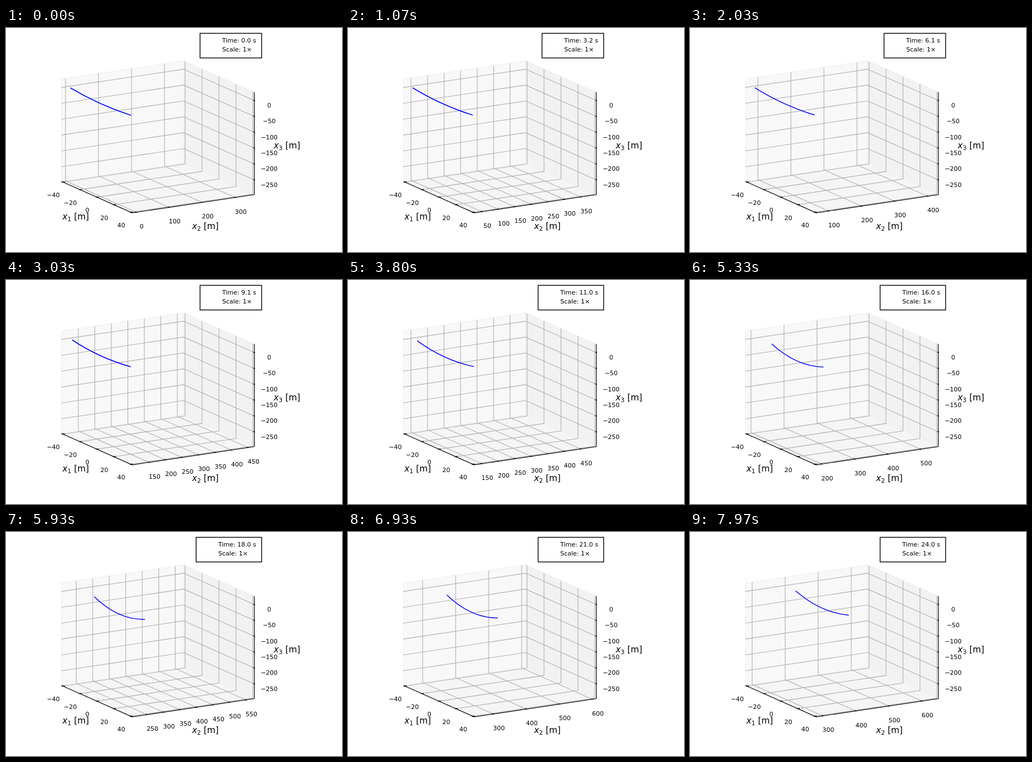
Animation of 600x400 px, one loop 8 s. Source, as an HTML page:

```html
<!DOCTYPE html>
<html lang="en">
<head>
<meta charset="utf-8">
<style>
  html, body { margin: 0; width: 100%; height: 100%; overflow: hidden; background: #fff; }
  svg { display: block; }
  text { font: 11px "DejaVu Sans", sans-serif; white-space: pre; }
  .tick { text-anchor: middle; }
  .label { font-size: 15.28px; }
  .label .var { font-style: italic; }
  .label .sub { font-size: 10.7px; }
  .pane { stroke: #efefef; }
  .grid { fill: none; stroke: #b0b0b0; stroke-width: 1.11; }
  .axis { fill: none; stroke: #000; stroke-width: 1.11; }
  .mark { fill: none; stroke: #000; stroke-width: 1.4; }
  .tether { fill: none; stroke: #00f; stroke-width: 1.5; }
  .legend { fill: #fff; stroke: #000; stroke-width: 1.4; }
</style>
</head>
<body>
<svg id="stage" width="600" height="400" viewBox="0 0 600 400"></svg>
<script>
const LOOP = 8000, FRAMES = 240;
const INWARD = 0.016, OUTWARD = 0.008;
const stage = document.getElementById('stage');

// Orthographic box: fractions along x1, x2 and downwards, from the top left corner.
const project = (a, b, c) => [99 + 126.3 * a + 218.2 * b, 91.1 + 56 * a - 32.5 * b + 183 * c];

const outline = corners => 'M' + corners.map(p => project(...p).map(v => v.toFixed(2))).join('L');
const line = (cls, ...corners) => `<path class="${cls}" d="${outline(corners)}"/>`;
const pane = (fill, ...corners) => `<path class="pane" fill="${fill}" d="${outline(corners)}Z"/>`;
const text = (cls, x, y, content) => `<text class="${cls}" x="${x}" y="${y}">${content}</text>`;
const tickText = ([x, y], dx, dy, value) =>
  text('tick', x + dx, Math.round(y + dy), String(value).replace('-', '\u2212'));
const axisLabel = (x, y, index) => text('label', x, y,
  `<tspan class="var">x</tspan><tspan class="sub" dy="2.5">${index}</tspan><tspan dy="-2.5"> [m]</tspan>`);

function fixedParts() {
  const panes =
    pane('#f8f8f8', [0, 0, 0], [0, 1, 0], [0, 1, 1], [0, 0, 1]) +
    pane('#f2f2f2', [0, 1, 0], [1, 1, 0], [1, 1, 1], [0, 1, 1]) +
    pane('#f5f5f5', [0, 0, 1], [0, 1, 1], [1, 1, 1], [1, 0, 1]);
  let grid = '', marks = '';
  for (let v = -40; v <= 40; v += 20) {
    const a = 0.5 + v / 80 * 0.96;
    grid += line('grid', [a, 0, 1], [a, 1, 1], [a, 1, 0]);
    marks += line('mark', [a, -OUTWARD, 1], [a, INWARD, 1]) + tickText(project(a, 0, 1), -17, 27.1, v);
  }
  for (let v = 0; v >= -250; v -= 50) {
    const c = (26.46 - v) / 322.9;
    grid += line('grid', [0, 0, c], [0, 1, c], [1, 1, c]);
    marks += line('mark', [1 - INWARD, 1, c], [1 + OUTWARD, 1, c]) + tickText(project(1, 1, c), 26.5, 12.4, v);
  }
  marks += line('axis', [0, 0, 1], [1, 0, 1], [1, 1, 1], [1, 1, 0]);
  marks += axisLabel(100.8, 342, 1) + axisLabel(332.3, 359, 2) + axisLabel(478, 215, 3);
  return { back: panes + grid, front: marks };
}

// The x2 window slides at constant speed; ticks are 100 apart when four fit, otherwise 50.
function slidingAxis(frame) {
  const span = 370.1, start = -12.2 + 1.2213 * frame;
  const low = start + span / 50, high = start + span * 49 / 50;
  const step = Math.ceil(low / 100) * 100 + 300 <= high ? 100 : 50;
  let grid = '', marks = '';
  for (let v = Math.ceil(low / step) * step; v <= high; v += step) {
    const b = (v - start) / span;
    grid += line('grid', [0, b, 0], [0, b, 1], [1, b, 1]);
    marks += line('mark', [1 - INWARD, b, 1], [1 + OUTWARD, b, 1]) + tickText(project(1, b, 1), 9.8, 29, v);
  }
  return { grid, marks };
}

// Where the two ends of the tether are at a few moments.
const keys = [
  { at: 0, ends: [115, 107, 223.3, 156] },
  { at: 91, ends: [118, 107, 223, 155] },
  { at: 140, ends: [134.5, 111.5, 230, 154.5] },
  { at: 178, ends: [157.5, 115.5, 248, 156] },
  { at: 208, ends: [176.5, 112.5, 267.5, 153.5] },
  { at: 239, ends: [188.5, 105, 283.5, 148.5] }
];

function speed(i, k) {
  const before = keys[Math.max(i - 1, 0)], after = keys[Math.min(i + 1, keys.length - 1)];
  return (after.ends[k] - before.ends[k]) / (after.at - before.at);
}

// Smooth cubic passage from key to key.
function endsAt(frame) {
  const next = Math.max(1, keys.findIndex(key => key.at >= frame)), i = next - 1;
  const p = keys[i], q = keys[next], gap = q.at - p.at, s = (frame - p.at) / gap;
  const ease = s * s * (3 - 2 * s);
  return p.ends.map((v, k) => v + (q.ends[k] - v) * ease +
    gap * s * (1 - s) * ((1 - s) * speed(i, k) - s * speed(next, k)));
}

// The tether keeps its length, so it sags more as its ends come together.
function tether(frame) {
  const [x0, y0, x1, y1] = endsAt(frame);
  const width = x1 - x0, sag = 7 + 0.85 * (108.5 - width), bend = 0.475;
  return `<path class="tether" d="M${x0} ${y0}Q${x0 + bend * width} ${y0 + bend * (y1 - y0) + sag} ${x1} ${y1}"/>`;
}

function legend(frame) {
  // Two significant digits.
  const seconds = frame < 100 ? frame / 10 : Math.round(frame / 10);
  const left = seconds < 10 ? 346.5 : 339.5;
  return `<rect class="legend" x="${left}" y="9.5" width="${456.5 - left}" height="44"/>` +
    text('', left + 39.5, 26, `Time: ${seconds.toFixed(1)} s`) +
    text('', left + 39.5, 42, 'Scale: 1×');
}

const { back, front } = fixedParts();
let shown = -1;

function draw(now) {
  const frame = Math.floor((now % LOOP + 5) * FRAMES / LOOP) % FRAMES;
  if (frame === shown) return;
  shown = frame;
  const { grid, marks } = slidingAxis(frame);
  stage.innerHTML = back + grid + front + marks + tether(frame) + legend(frame);
}

const begin = performance.now();
function tick() {
  draw(performance.now() - begin);
  requestAnimationFrame(tick);
}
tick();
</script>
</body>
</html>
```
